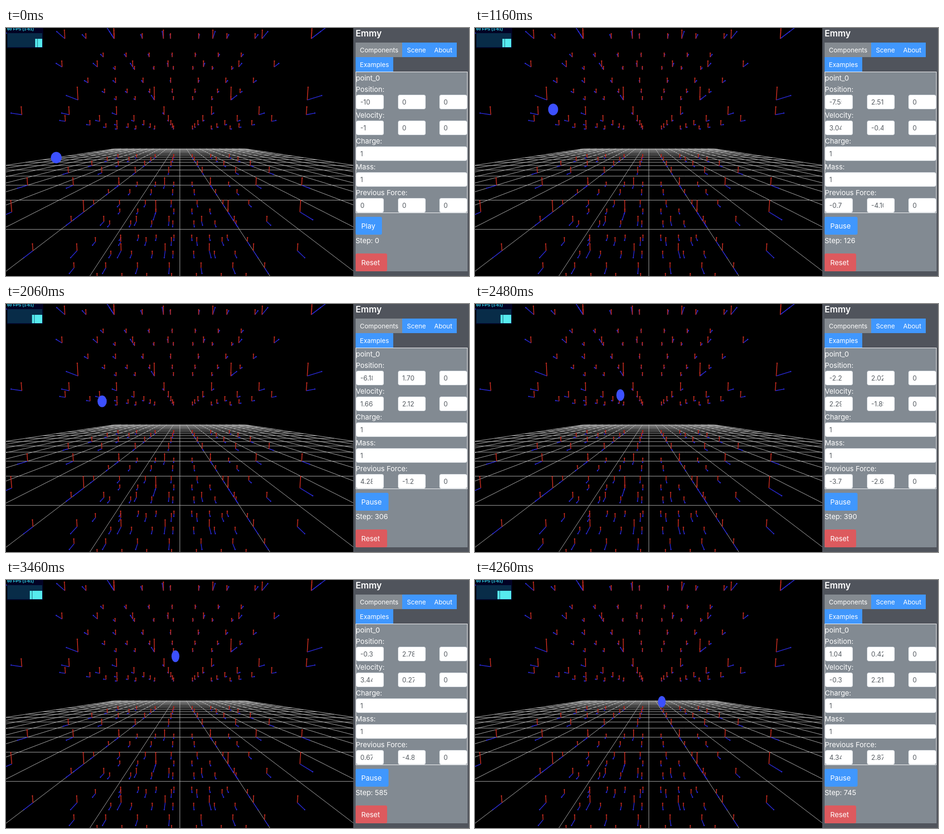
Recreate the animation shown at these times as an HTML page with a canvas. Size 984 by 528 pixels, loop 4280 ms.

```html
<!DOCTYPE html>
<html lang="en">
<head>
<meta charset="utf-8">
<title>Charged particle</title>
<style>
  html, body { margin: 0; width: 984px; height: 528px; overflow: hidden; background: #000; }
  canvas, svg.ui { position: absolute; left: 0; top: 0; }
  text { font-family: Inter, Roboto, sans-serif; white-space: pre; }
</style>
</head>
<body>
<canvas id="field" width="984" height="528"></canvas>
<svg class="ui" id="ui" width="984" height="528"></svg>
<script>
const LOOP = 4280, FRAME = 20;

// Camera at (0, 1, 10) looking at the origin, on a horizontally squeezed view.
const VIEW = { cx: 369.5, cy: 276, fx: 264, fy: 401 };
const SIN = 1 / Math.sqrt(101), COS = 10 * SIN;

function project(x, y, z) {
  const depth = (10 - z) * COS + (1 - y) * SIN;
  const up = (y - 1) * COS + (10 - z) * SIN;
  return [VIEW.cx + VIEW.fx * x / depth, VIEW.cy - VIEW.fy * up / depth, depth];
}

function line(g, a, b) {
  g.beginPath();
  g.moveTo(a[0], a[1]);
  g.lineTo(b[0], b[1]);
  g.stroke();
}

function arrow(g, from, to, color, width) {
  g.strokeStyle = g.fillStyle = color;
  g.lineWidth = width;
  line(g, from, to);
  g.beginPath();
  g.arc(to[0], to[1], 1.4, 0, 7);
  g.fill();
}

function drawScene() {
  const g = document.getElementById('field').getContext('2d');
  g.fillStyle = '#000';
  g.fillRect(0, 0, 984, 528);

  g.strokeStyle = '#b4b4b4';
  g.lineWidth = 1;
  for (let i = -10; i <= 10; i++) line(g, project(i, 0, -9), project(i, 0, 9));
  for (let z = -9; z <= 9; z++) line(g, project(-10, 0, z), project(10, 0, z));

  // Electric field points up (red), magnetic field towards the viewer (blue).
  for (let z = -10; z <= 8; z += 3)
    for (let y = -10; y <= 8; y += 3)
      for (let x = -10; x <= 8; x += 3) {
        const p = project(x, y, z);
        arrow(g, p, project(x, y, z + 0.5), '#2828d2', 1.6);
        arrow(g, p, project(x, y + 0.32, z), '#bc2a1e', 1.8);
      }
}

// Particle in crossed fields E = (0, 2, 0) and B = (0, 0, 2).
function simulate(count) {
  const states = [{ p: [-10, 0], v: [-1, 0], f: [0, 0] }];
  for (let i = 0; i < count; i++) {
    const { p, v } = states[i];
    const f = [2 * v[1], 2 - 2 * v[0]];
    const nv = v.map((c, k) => c + f[k] / 75);
    states.push({ p: p.map((c, k) => c + nv[k] / 60), v: nv, f });
  }
  return states;
}

const rect = (x, y, w, h, fill, more = '') =>
  `<rect x="${x}" y="${y}" width="${w}" height="${h}" fill="${fill}" ${more}/>`;
const label = (str, x, y, size = 15, more = '') =>
  `<text x="${x}" y="${y}" font-size="${size}" fill="#fff" ${more}>${str}</text>`;

function input(x, y, w, id, value) {
  return rect(x + 0.5, y + 0.5, w - 1, 30, '#fff', 'rx="3.5" stroke="#ced4da"') +
    `<svg x="${x + 9}" y="${y}" width="26" height="31">` +
    `<text id="${id}" y="20.5" font-size="14" fill="#555b61">${value}</text></svg>`;
}

function vectorInputs(name, y) {
  return [744, 833, 921].map((x, i) => input(x, y, 59, name + i, 0)).join('');
}

function buildUi() {
  const blue = '#4097fd', grey = '#828a92';
  document.getElementById('ui').innerHTML =
    rect(2, 0, 77, 43, '#020224') +
    label('', 2.5, 5, 9, 'id="fps" font-weight="700" style="fill:#2fd6e6;font-family:\'Liberation Sans\',Arial,sans-serif"') +
    rect(3, 11, 74, 30, '#082c48') +
    rect(0, 23, 0, 18, '#56ebee', 'id="bars"') +
    rect(0, 23, 0.8, 18, '#0b3550', 'id="gap"') +
    '<ellipse id="ball" fill="#3c50ff"/>' +

    rect(738, 0, 246, 528, '#50545c') +
    rect(743, 93, 238, 425, grey) +
    label('Emmy', 743, 18, 18.6, 'font-weight="600"') +
    rect(743, 31, 99, 31, '#858b91') +
    rect(842, 31, 116, 31, blue) +
    rect(743, 62, 80, 31, blue) +
    label('Components', 752, 52, 13.6) +
    label('Scene', 852, 52, 13.6) +
    label('About', 910, 52, 13.6) +
    label('Examples', 752, 83, 13.6) +
    rect(743.5, 93.5, 237, 300, 'none', 'stroke="#fff"') +
    label('point_0', 743.5, 112) +
    label('Position:', 743.5, 136) + vectorInputs('p', 142) +
    label('Velocity:', 743.5, 191) + vectorInputs('v', 197) +
    label('Charge:', 743.5, 246) + input(744, 252, 236, 'charge', 1) +
    label('Mass:', 743.5, 301) + input(744, 307, 236, 'mass', 1) +
    label('Previous Force:', 743.5, 356) + vectorInputs('f', 362) +
    rect(743, 402, 56, 38, blue, 'id="button" rx="3.5"') +
    label('', 755, 427, 15, 'id="action"') +
    label('', 743, 458, 15, 'id="step"') +
    rect(743, 480, 67, 38, '#dd5a5e', 'rx="3.5"') +
    label('Reset', 755, 505);
}

drawScene();
buildUi();
const states = simulate(750);
const el = {};
document.querySelectorAll('#ui [id]').forEach(e => { el[e.id] = e; });

function set(id, attrs) {
  for (const k in attrs) el[id].setAttribute(k, attrs[k]);
}
function write(id, str) {
  if (el[id].textContent !== str) el[id].textContent = str;
}
const show = n => Number.isInteger(n) ? String(n) : n.toFixed(6);

function stepAt(t) {
  if (t < 540) return 0;
  return Math.round((t - 530) / 5) - (t >= 2900 ? 1 : 0);
}

function render(time) {
  const t = Math.floor((time % LOOP) / FRAME) * FRAME;
  const n = stepAt(t), s = states[n], running = n > 0;

  for (const key of ['p', 'v', 'f'])
    s[key].forEach((c, i) => write(key + i, show(c)));

  const [x, y, depth] = project(s.p[0], s.p[1], 0);
  const skew = Math.hypot(1, s.p[0] / depth);
  set('ball', { cx: x, cy: y, rx: 0.31 * VIEW.fx / depth * skew, ry: 0.305 * VIEW.fy / depth });

  write('action', running ? 'Pause' : 'Play');
  write('step', 'Step: ' + n);
  const pressed = t >= 520 && t < 1000;
  set('button', { width: running ? 70 : 56, fill: pressed ? '#3a82de' : '#4097fd' });

  write('fps', (t >= 2900 && t < 3200 ? 59 : 60) + ' FPS (1-61)');
  const left = 62 - 0.95 * Math.floor(t / 280);
  set('bars', { x: left, width: 77 - left });
  set('gap', { x: left + 4.5 });
}

const start = performance.now();
function tick() {
  render(performance.now() - start);
  requestAnimationFrame(tick);
}
tick();
</script>
</body>
</html>
```
